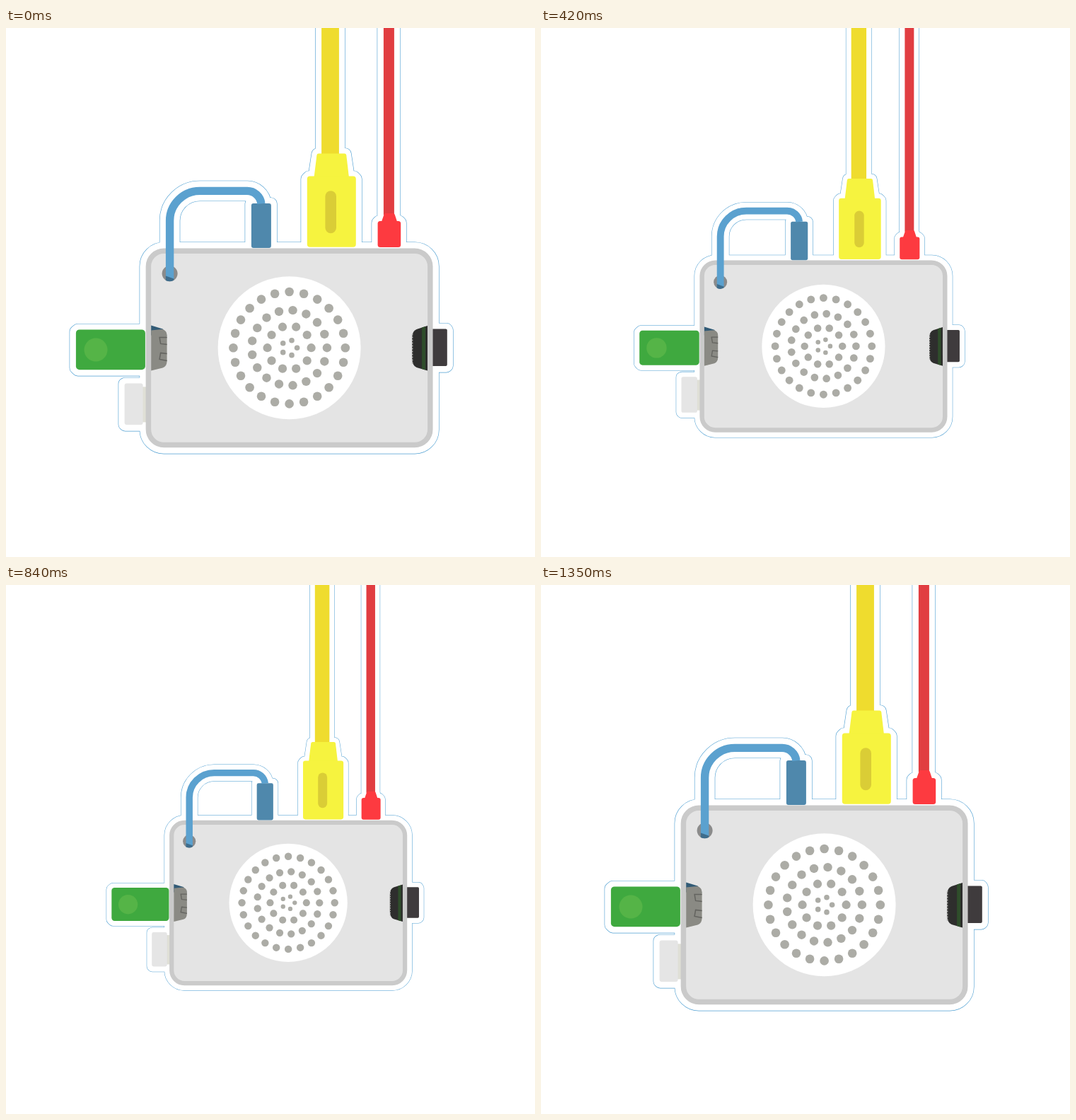
Recreate the animation shown at these times as an HTML page. Size 748 by 748 pixels, loop 1380 ms.

```html
<!DOCTYPE html>
<html lang="en">
<head>
<meta charset="utf-8">
<title>Pulsing device</title>
<style>
  html, body { margin: 0; width: 100%; height: 100%; overflow: hidden; background: #fff; }
  svg { display: block; width: 100vw; height: 100vh; }
</style>
</head>
<body>
<svg viewBox="0 0 748 748" xmlns="http://www.w3.org/2000/svg">
  <g id="device">
    <g id="edge"></g>

    <!-- cables -->
    <rect x="446.5" y="-150" width="24.8" height="330" fill="#efdc2e"/>
    <path d="M442.5 177.2H479Q481.300 177.200 481.700 179.500L485.500 212H435.800L439.800 179.500Q440.200 177.200 442.500 177.200Z" fill="#f6f33f"/>
    <rect x="426.200" y="209.200" width="69" height="100.200" rx="4" fill="#f6f33f"/>
    <rect x="451.800" y="229.800" width="15.600" height="60" rx="7.800" fill="#dacd36"/>
    <rect x="534.300" y="-150" width="15" height="414" fill="#e13d41"/>
    <path d="M537 261.700H548Q549.700 261.700 550.200 263.500L554 275H530.800L534.800 263.500Q535.300 261.700 537 261.700Z" fill="#fd3a40"/>
    <rect x="526" y="272.700" width="32.600" height="37" rx="3.500" fill="#fd3a40"/>

    <!-- side plugs -->
    <rect x="99.300" y="426" width="98" height="56.800" rx="5" fill="#3fa93f"/>
    <circle cx="127.400" cy="454.700" r="16.500" fill="#55b447"/>
    <rect x="193" y="507" width="8" height="50" fill="#dfdfd6"/>
    <rect x="168" y="502.200" width="26" height="58.500" rx="3" fill="#e5e5e5"/>
    <rect x="600" y="425.200" width="24.200" height="52.500" rx="2" fill="#3f3b3d"/>

    <!-- case -->
    <rect x="201.800" y="314.800" width="398.400" height="274.400" rx="22" fill="#e4e4e4" stroke="#cacaca" stroke-width="7.500"/>
    <path d="M205.600 420L222 425L228 434H205.600Z" fill="#325b76"/>
    <path d="M205.600 427L221 425.500Q228 427 228 434V470Q228 478 222 480L205.600 484Z" fill="#8a8a84"/>
    <path d="M228 437H217.500L219 446L228 447M228 460L219 459L217.500 468L228 470" fill="none" stroke="#63635f" stroke-width="1.500"/>
    <path d="M596.400 420.500L581 425.500Q574.500 428 574.500 438V466Q574.500 477 581 479.500L596.400 484Z" fill="#2e2e2d"/>
    <path d="M588.500 423.200L593.500 421.500V483L588.500 481.700Z" fill="#2f4d2b"/>
    <path d="M575 432V474" stroke="#b4b4b2" stroke-width="1.600" stroke-dasharray="2 2"/>

    <circle cx="401" cy="451.800" r="101" fill="#fff"/>
    <g id="holes" fill="#acaca6"></g>

    <!-- strap -->
    <circle cx="232" cy="346.800" r="11" fill="#8b8b8b"/>
    <rect x="347.300" y="247.700" width="28" height="63" rx="3" fill="#4f88ac"/>
    <path id="strap" d="M232 355V272A42.500 42 0 0 1 274.500 230H341A20 20 0 0 1 361.300 248" fill="none" stroke="#5ba1cf" stroke-width="11.400"/>
    <path d="M226.300 350L237.700 354V356Q232.300 359.500 226.300 356.500Z" fill="#3f6d8c"/>
  </g>
</svg>
<script>
const NS = 'http://www.w3.org/2000/svg';
const byId = id => document.getElementById(id);

function add(parent, tag, attrs) {
  const el = document.createElementNS(NS, tag);
  for (const key in attrs) el.setAttribute(key, attrs[key]);
  parent.appendChild(el);
}

// Die-cut border: the silhouette widened twice, blue below white.
const solids = [
  'M446.5 -150H471V180H446.5Z',
  'M441 178H480L485 211H436Z',
  'M429 210H492L495 213V309H426V213Z',
  'M534 -150H549V264H534Z',
  'M536 262H548L553 275H531Z',
  'M528 273H556L558 275V310H526V275Z',
  'M102 426.500H197V483H102L99 480V429Z',
  'M169 502.500H200V561H169L168 560V503Z',
  'M600 425.500H623L624 427V477L623 478H600Z',
  'M347 248H375V311H347Z',
  'M223.500 311H578.500A25.500 25.500 0 0 1 604 336.500V567.500A25.500 25.500 0 0 1 578.500 593H223.500A25.500 25.500 0 0 1 198 567.500V336.500A25.500 25.500 0 0 1 223.500 311Z'
].join('');

function border(color, width) {
  const common = { stroke: color, 'stroke-linejoin': 'round' };
  add(byId('edge'), 'path', { ...common, d: solids, fill: color, 'stroke-width': width });
  add(byId('edge'), 'path', {
    ...common, d: byId('strap').getAttribute('d'), fill: 'none', 'stroke-width': 11.4 + width
  });
}
border('#4f9fd2', 18);
border('#fff', 16.8);

// Speaker holes: count, ring radius, hole radius
for (const [count, ring, r] of [[24, 79.2, 6.3], [17, 53.3, 6.2], [10, 31, 6.1], [5, 11, 3.8]]) {
  for (let i = 0; i < count; i++) {
    const a = i / count * 2 * Math.PI;
    add(byId('holes'), 'circle', { cx: 401 + ring * Math.cos(a), cy: 451.8 - ring * Math.sin(a), r });
  }
}

const LOOP = 1380, STEP = 30, PERIOD = 1350;
const CX = 392.5, CY = 435, DX = -0.4, DY = 0.4;
const device = byId('device');

function draw(ms) {
  const t = Math.floor(ms % LOOP / STEP) * STEP;
  const s = 0.9 + 0.1 * Math.cos(2 * Math.PI * t / PERIOD);
  const x = CX * (1 - s) + DX, y = CY * (1 - s) + DY;
  device.setAttribute('transform', `matrix(${s} 0 0 ${s} ${x} ${y})`);
}

const start = performance.now();
function tick() {
  draw(performance.now() - start);
  requestAnimationFrame(tick);
}
tick();
</script>
</body>
</html>
```
